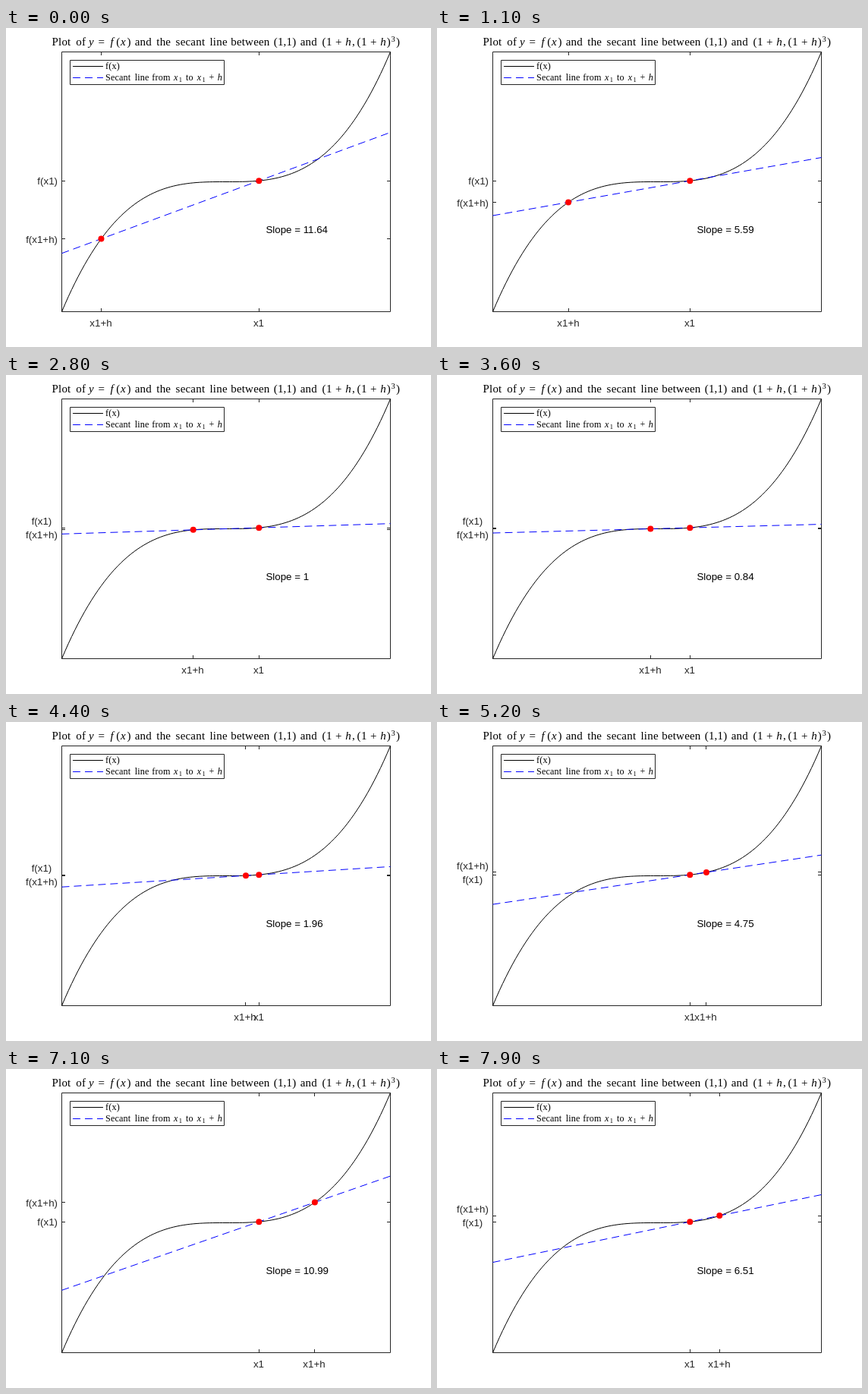
Animation, 560 px wide and 420 px high, one loop 8 s. Source, as an HTML page:

```html
<!DOCTYPE html>
<html lang="en">
<head>
<meta charset="utf-8">
<title>Secant line</title>
<style>
  html, body { margin: 0; width: 100%; height: 100%; overflow: hidden; background: #fff; }
  svg { display: block; }
  path { fill: none; stroke: #000; }
  text { font: 13.333px "Liberation Sans", Arial, sans-serif; fill: #262626; }
  .axis { stroke: #262626; }
  .secant { stroke: #00f; stroke-dasharray: 10 6; }
  .black { fill: #000; }
  .math { font-family: "Liberation Serif", "Times New Roman", serif; fill: #000; }
  .title { font-size: 15px; letter-spacing: .2px; }
  .legend { font-size: 12.2px; letter-spacing: .15px; }
  .small { font-size: 70%; }
  .it { font-style: italic; }
</style>
</head>
<body>
<svg id="stage" width="560" height="420" viewBox="0 0 560 420"></svg>
<script>
const stage = document.getElementById('stage');

function add(tag, attrs, parent = stage) {
  const el = document.createElementNS('http://www.w3.org/2000/svg', tag);
  set(el, attrs);
  return parent.appendChild(el);
}
function set(el, attrs) {
  for (const key in attrs) {
    if (key === 'text') el.textContent = attrs[key];
    else el.setAttribute(key, attrs[key]);
  }
}

// Each part is [text, x, class, vertical shift].
function formula(cls, y, parts) {
  const line = add('text', { class: 'math ' + cls });
  for (const [text, x, style = '', shift = 0] of parts)
    add('tspan', { text, x, y: y + shift, class: style }, line);
}

const left = 73.5, right = 506.5, top_ = 31.5, bottom = 373.5;
const X = x => left + (x + 5) * (right - left) / 10;
const Y = y => bottom - (y + 125) * (bottom - top_) / 250;
const cube = x => x ** 3;
const snap = v => Math.floor(v) + .5;
const box = (x0, y0, x1, y1) => `M${x0} ${y0}H${x1}V${y1}H${x0}Z`;

formula('title', 23, [
  ['Plot', 60.5], ['of', 92.3], ['y', 109, 'it'], ['=', 121.5], ['f', 137.5, 'it'],
  ['(', 145.3], ['x', 151, 'it'], [')', 159.4], ['and', 169.7], ['the', 198.3],
  ['secant', 223.6], ['line', 268.5], ['between', 296.2], ['(1,1)', 352.7], ['and', 387.7],
  ['(', 416.5], ['1', 422], ['+', 434], ['h', 447.3, 'it'], [',', 456],
  ['(', 462.4], ['1', 468], ['+', 480], ['h', 493.2, 'it'], [')', 501.8],
  ['3', 507.5, 'small', -5.5], [')', 514]
]);

add('path', { class: 'axis', d: box(left, top_, right, bottom) });
const ticks = add('path', { class: 'axis' });

let curve = '';
for (let i = -50; i <= 50; i++) curve += `${curve ? 'L' : 'M'}${X(i / 10)} ${Y(cube(i / 10))}`;
add('path', { d: curve });
const secant = add('path', { class: 'secant' });
const dots = [0, 1].map(() => add('circle', { r: 4, fill: '#f00' }));

add('path', { class: 'axis', d: box(84.5, 42.5, 287.5, 74.5) });
add('path', { d: 'M88 50.5H128' });
add('path', { class: 'secant', d: 'M88 65.5H128' });
formula('legend', 54, [['f(x)', 131]]);
formula('legend', 69, [
  ['Secant', 131], ['line', 169.7], ['from', 192.3], ['x', 221, 'it'], ['1', 227.7, 'small', 2],
  ['to', 236.9], ['x', 251.8, 'it'], ['1', 258.6, 'small', 2], ['+', 267.5], ['h', 278.7, 'it']
]);

const names = ['x1', 'x1+h'];
const xLabels = names.map(text => add('text', { text, y: 393, 'text-anchor': 'middle' }));
const yLabels = names.map(name => add('text', { text: `f(${name})` }));
const slopeLabel = add('text', { class: 'black', x: 342.4, y: 270 });

// Second point in tenths; it skips h = 0 and turns back at x = 3.
function position(step) {
  if (step < 48) return step - 38;
  return step < 68 ? step - 37 : 98 - step;
}

function draw(step) {
  const x = position(step) / 10;
  const slope = x * x + x + 1;
  const xs = [1, x].map(X), ys = [1, x].map(v => Y(cube(v)));
  const merged = Math.abs(ys[0] - ys[1]) < 18;
  const upper = Math.min(...ys);
  let marks = '';

  for (const i of [0, 1]) {
    const tx = snap(xs[i]), ty = snap(ys[i]);
    marks += `M${tx} ${top_}v4.5M${tx} ${bottom}v-4.5M${left} ${ty}h4.5M${right} ${ty}h-4.5`;
    set(dots[i], { cx: xs[i], cy: ys[i] });
    set(xLabels[i], { x: tx - .5 });

    // Labels that would collide become two centred lines at the upper tick.
    const shift = ys[i] === upper ? -9 : 9;
    set(yLabels[i], merged
      ? { x: 47, y: Math.round(upper + 5.3) + shift, 'text-anchor': 'middle' }
      : { x: 68, y: Math.round(ys[i] + 5.3), 'text-anchor': 'end' });
  }
  set(ticks, { d: marks });
  set(secant, { d: `M${left} ${Y(1 - 6 * slope)}L${right} ${Y(1 + 4 * slope)}` });
  set(slopeLabel, { text: 'Slope = ' + +slope.toFixed(2) });
}

const start = performance.now();
function tick() {
  draw(Math.floor((performance.now() - start) % 8000 / 100));
  requestAnimationFrame(tick);
}
tick();
</script>
</body>
</html>
```
